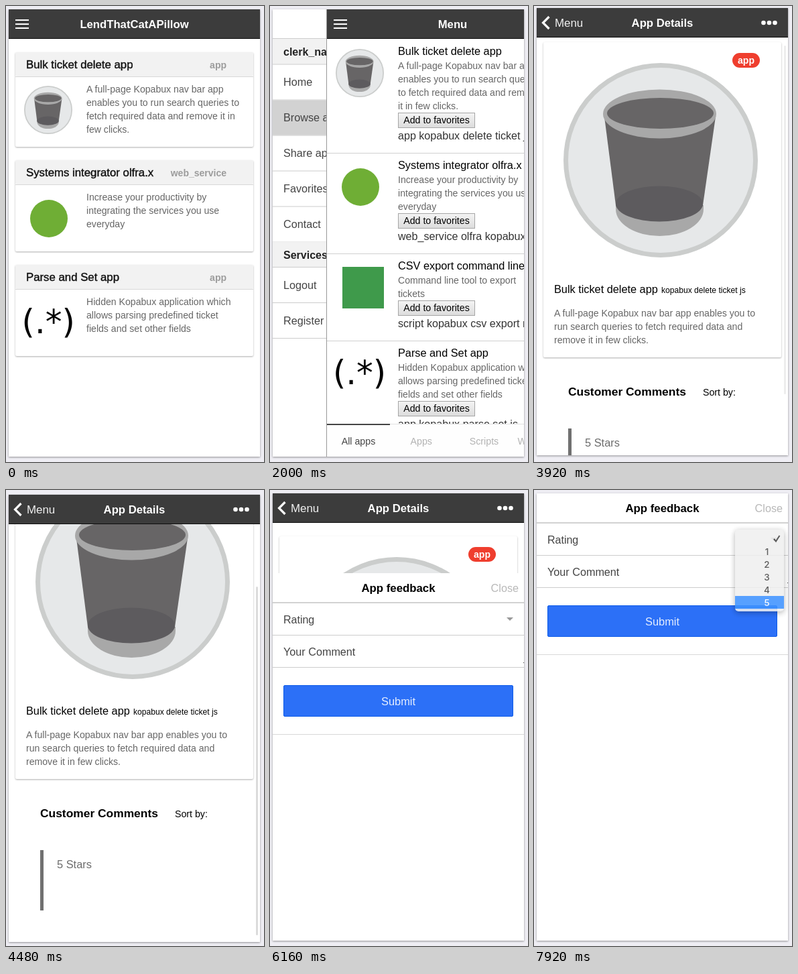
An HTML page that plays this animation: 385x680 px, repeating every 8 s.

```html
<!DOCTYPE html>
<html lang="en">
<head>
<meta charset="utf-8">
<title>App browser</title>
<style>
  html, body { margin: 0; width: 100%; height: 100%; overflow: hidden; background: #efeef4; }
  svg { display: block; width: 385px; height: 680px; font-family: "Liberation Sans", Arial, sans-serif; }
  text { white-space: pre; }
  .medium { stroke-width: .4px; }
  .bold { font-weight: 700; }
  .end { text-anchor: end; }
  .mid { text-anchor: middle; }
  .regex { font-family: "DejaVu Sans", sans-serif; }
  .num { font-family: Inter, sans-serif; font-weight: 500; }
  .card { fill: #fff; filter: drop-shadow(0 1px 1px rgba(0, 0, 0, .32)); }
  .phone { fill: #fff; filter: drop-shadow(0 1px 1.5px rgba(0, 0, 0, .4)); }
  .sheet { fill: #efefef; filter: drop-shadow(0 2px 4px rgba(0, 0, 0, .35)); }
</style>
</head>
<body>
<svg viewBox="0 0 385 680">
  <defs>
    <clipPath id="screen"><rect x="4" y="5" width="375" height="667"/></clipPath>
    <linearGradient id="btn" x2="0" y2="1">
      <stop stop-color="#f4f4f4"/><stop offset="1" stop-color="#dcdcdc"/>
    </linearGradient>
    <g id="bin">
      <circle r="141.5" fill="#e6e8e9" stroke="#cbcdcc" stroke-width="7"/>
      <path d="M-67 67V73A65.5 40 0 0 0 64 73V67Z" fill="#a8a8a8"/>
      <path d="M-84-65L-67 67A65.5 26 0 0 0 63 67L82-65Z" fill="#676566"/>
      <ellipse cx="-2" cy="65" rx="65" ry="26.5" fill="#5d5b5e"/>
      <ellipse cx="-1.5" cy="-69" rx="84.5" ry="36.5" fill="#a8a8a8"/>
      <ellipse cx="-.5" cy="-70" rx="79.5" ry="23" fill="#676566"/>
    </g>
  </defs>
  <g id="phone">
    <rect class="phone" x="4" y="5" width="375" height="667"/>
    <g clip-path="url(#screen)">
      <g id="side"></g>
      <g id="page">
        <rect x="3" y="5" width="1" height="667" fill="#999"/>
        <rect x="4" y="5" width="375" height="667" fill="#fff"/>
        <g id="home"></g>
        <g id="list"></g>
        <g id="detail">
          <rect x="4" y="49" width="375" height="623" fill="#fff"/>
          <g id="scroll"></g>
          <rect id="bar" x="373" y="50" width="3" height="520" rx="1.5" fill="#000"/>
        </g>
        <rect x="4" y="5" width="375" height="43" fill="#3c3c3c"/>
        <rect x="4" y="48" width="375" height="1" fill="#0c0c0c"/>
        <g id="mainHead">
          <path d="M14 21H34M14 27H34M14 33H34" stroke="#fff" stroke-width="2"/>
        </g>
        <g id="detailHead">
          <path d="M22.5 18L13.5 27L22.5 36" fill="none" stroke="#fff" stroke-width="3.2"/>
          <g id="dots" fill="#fff">
            <circle cx="342.5" cy="27" r="3.3"/><circle cx="351" cy="27" r="3.3"/><circle cx="359.5" cy="27" r="3.3"/>
          </g>
        </g>
      </g>
      <g id="modal"></g>
    </g>
    <g id="popup"></g>
  </g>
</svg>
<script>
const $ = id => document.getElementById(id);
const add = (id, ...parts) => $(id).insertAdjacentHTML('beforeend', parts.flat().join(''));

const text = (x, y, size, fill, str, cls = '') =>
  `<text x="${x}" y="${y}" font-size="${size}" fill="${fill}" class="${cls}"` +
  `${cls.includes('medium') ? ` stroke="${fill}"` : ''}>${str}</text>`;
const rect = (x, y, w, h, fill, more = '') =>
  `<rect x="${x}" y="${y}" width="${w}" height="${h}" fill="${fill}" ${more}/>`;
const line = (y, fill = '#ccc') => rect(4, y, 375, 1, fill);
const lines = (x, y, rows) => rows.map((s, i) => text(x, y + i * 20, 14.1, '#666', s));
const bin = (x, y, r) => `<use href="#bin" transform="translate(${x} ${y}) scale(${r / 145})"/>`;
const disc = (x, y) => `<circle cx="${x}" cy="${y}" r="28" fill="#6fae35"/>`;
const regex = (x, y) => text(x, y, 49.5, '#000', '(.*)', 'regex');

// Home cards
const card = (y, h, title, kind, rows, icon) => [
  rect(14, y, 355, h, '#fff', 'rx="2" class="card"'),
  rect(14, y, 355, 36, '#f2f2f2', 'rx="2"'),
  rect(14, y + 36, 355, 1, '#d8d8d8'),
  text(30, y + 24, 16.8, '#111', title, 'medium'),
  text(329, y + 24, 14, '#9c9c9c', kind, 'bold end'),
  ...lines(120, y + 60, rows), icon
];
add('home',
  card(69, 141, 'Bulk ticket delete app', 'app',
    ['A full-page Kopabux nav bar app', 'enables you to run search queries to',
      'fetch required data and remove it in', 'few clicks.'], bin(63, 155, 36)),
  card(230, 136, 'Systems integrator olfra.x', 'web_service',
    ['Increase your productivity by', 'integrating the services you use', 'everyday'], disc(64, 317)),
  card(386, 136, 'Parse and Set app', 'app',
    ['Hidden Kopabux application which', 'allows parsing predefined ticket',
      'fields and set other fields'], regex(23.6, 488)));

// Side menu
let rowY = 49;
const divider = label => {
  const y = rowY;
  rowY += 37.5;
  return rect(4, y, 275, 37.5, '#f2f2f2') + line(rowY) + text(20, y + 25, 16, '#222', label, 'bold');
};
const entry = label => {
  const y = rowY;
  rowY += 53;
  return (label.startsWith('Browse') ? rect(4, y + 1, 275, 52, '#d2d2d2', 'id="browse"') : '') +
    line(rowY) + text(20, y + 32.5, 16.2, '#444', label);
};
add('side', line(48), divider('clerk_name'),
  ['Home', 'Browse apps', 'Share app', 'Favorites', 'Contact'].map(entry),
  divider('Services'), ['Logout', 'Register'].map(entry));

// App list
let itemY = 49;
const item = (title, rows, tags, icon) => {
  const y = itemY, by = y + 30 + rows.length * 20;
  itemY += 90 + rows.length * 20;
  return [
    y === 49 ? rect(4, y, 375, 170, '#d4d4d4', 'id="pressed"') : '',
    line(itemY, '#d0d0d0'),
    text(110, y + 24, 16.3, '#000', title),
    ...lines(110, y + 45, rows),
    rect(110.5, by + .5, 114, 22, 'url(#btn)', 'stroke="#a6a6a6"'),
    text(167.5, by + 16, 14.2, '#000', 'Add to favorites', 'mid'),
    text(110, by + 40, 16.1, '#333', tags), icon
  ];
};
add('list',
  item('Bulk ticket delete app', ['A full-page Kopabux nav bar app', 'enables you to run search queries',
    'to fetch required data and remove', 'it in few clicks.'], 'app kopabux delete ticket js', bin(53, 100, 36)),
  item('Systems integrator olfra.x', ['Increase your productivity by', 'integrating the services you use',
    'everyday'], 'web_service olfra kopabux', disc(54, 270)),
  item('CSV export command line', ['Command line tool to export', 'tickets'],
    'script kopabux csv export ruby', rect(27, 389, 62, 62, '#3f9a4b')),
  item('Parse and Set app', ['Hidden Kopabux application which', 'allows parsing predefined ticket',
    'fields and set other fields'], 'app kopabux parse set js', regex(13, 564)),
  rect(4, 623, 375, 49, '#fefefe'), line(623, '#e2e2e2'), rect(4, 623, 94, 2, '#444'),
  ['All apps', 'Apps', 'Scripts', 'Web Services'].map((s, i) =>
    text(51 + i * 93.75, 654, 14.2, i ? '#b2b2b2' : '#444', s, 'mid')));

// App details
add('scroll',
  rect(14, 69, 355, 470, '#fff', 'rx="2" class="card"'), bin(189, 245, 145),
  rect(296, 85, 41, 22, '#ef3e2e', 'rx="11"'), text(316.5, 101, 14, '#fff', 'app', 'bold mid'),
  text(30, 443, 16.3, '#000', 'Bulk ticket delete app'),
  text(190, 443, 12.1, '#000', 'kopabux delete ticket js'),
  lines(30, 478, ['A full-page Kopabux nav bar app enables you to',
    'run search queries to fetch required data and', 'remove it in few clicks.']),
  text(51, 596, 17.4, '#000', 'Customer Comments', 'bold'), text(252, 596, 14.2, '#000', 'Sort by:'),
  rect(51, 645, 5, 90, '#707070'), text(76, 672, 16.4, '#6c6c6c', '5 Stars'));

add('mainHead', text(191.5, 33, 16.7, '#fff', '', 'bold mid'));
add('detailHead', text(31, 33, 16.9, '#f0f0f0', 'Menu'),
  text(191.5, 33, 16.7, '#fff', 'App Details', 'bold mid'));

// Feedback form
add('modal',
  rect(4, 5, 375, 667, '#fff'), rect(4, 48, 375, 2, '#d2d2d2'),
  text(191.5, 33, 16.8, '#000', 'App feedback', 'bold mid'),
  text(371, 33, 16.2, '#b8b8b8', 'Close', 'end'),
  text(20, 80, 16, '#444', 'Rating'), '<path d="M353 71h10l-5 5z" fill="#999"/>',
  line(97), text(20, 128, 16.2, '#444', 'Your Comment'), rect(378, 138, 1, 1, '#444'), line(145),
  rect(20.5, 172.5, 342, 46, '#2c70f7', 'rx="1.5" stroke="#0c5be8"'),
  text(191.5, 202, 16.4, '#e6eefe', 'Submit', 'mid'), line(245, '#d8d8d8'));
add('popup',
  rect(300, 59, 73, 122, '#efefef', 'rx="5" class="sheet"'),
  rect(300, 63, 73, 19, '#3f93ff', 'id="pick"'),
  '<path id="tick" d="M358 73L361 76.5L366.5 68" fill="none" stroke="#444" stroke-width="2"/>',
  [1, 2, 3, 4, 5].map(n => text(347.5, 77.5 + n * 19, 13.5, '#444', n, 'num mid')));

const title = $('mainHead').querySelector('text');
const nums = $('popup').querySelectorAll('text');
const STEP = 80, LOOP = 8000;
const span = (t, a, b) => Math.min(1, Math.max(0, (t - a) / (b - a)));
const easeOut = u => 1 - (1 - u) ** 3;
const smooth = u => u * u * (3 - 2 * u);
const move = (id, x, y) => $(id).setAttribute('transform', `translate(${Math.round(x)} ${Math.round(y)})`);
const show = (id, on) => $(id).setAttribute('opacity', +on);
const pickTimes = [[7120, 0], [7360, 2], [7440, 4], [7600, 5], [7760, -1], [7840, 5]];

function draw(t) {
  // Side menu and tab change
  const open = easeOut(span(t, 1040, 1360)) - easeOut(span(t, 1920, 2160));
  move('page', 275 * open, 0);
  const browsing = t >= 2000;
  show('browse', t >= 1840);
  show('home', !browsing);
  show('list', browsing);
  show('pressed', t >= 2960 && t < 3200);
  title.textContent = browsing ? 'Menu' : 'LendThatCatAPillow';

  // Push to details
  const nav = easeOut(span(t, 3120, 3680));
  move('list', -124 * nav, 0);
  move('detail', 375 * (1 - nav), 0);
  show('mainHead', 1 - nav);
  show('detailHead', nav);
  move('detailHead', 90 * (1 - nav), 0);

  // Scroll with a slight pull of the whole phone
  const down = span(t, 3840, 4240), up = span(t, 4400, 4800);
  const top = 123 * (smooth(down) - smooth(up));
  move('phone', 0, 3.4 * (Math.sin(Math.PI * up) - Math.sin(Math.PI * down)));
  move('scroll', 0, -top);
  move('bar', 0, top * .835);
  show('bar', .14 * (span(t, 3760, 4080) - span(t, 5280, 5440)));
  show('dots', t >= 5200 && t < 5600 ? .8 : 1);

  // Form and rating picker
  move('modal', 0, 667 * (1 - easeOut(span(t, 5920, 6470))));
  show('popup', t < 7120 ? 0 : t < 7920 ? 1 : .87);
  const pick = pickTimes.reduce((p, [at, n]) => t >= at ? n : p, 0);
  show('pick', pick >= 0);
  move('pick', 0, 19 * Math.max(0, pick));
  $('tick').setAttribute('stroke', pick ? '#444' : '#fff');
  nums.forEach((n, i) => n.setAttribute('fill', pick === i + 1 ? '#fff' : '#444'));
}

const start = performance.now();
function tick() {
  const t = (performance.now() - start) % LOOP;
  draw(Math.floor(t / STEP) * STEP);
  requestAnimationFrame(tick);
}
tick();
</script>
</body>
</html>
```
